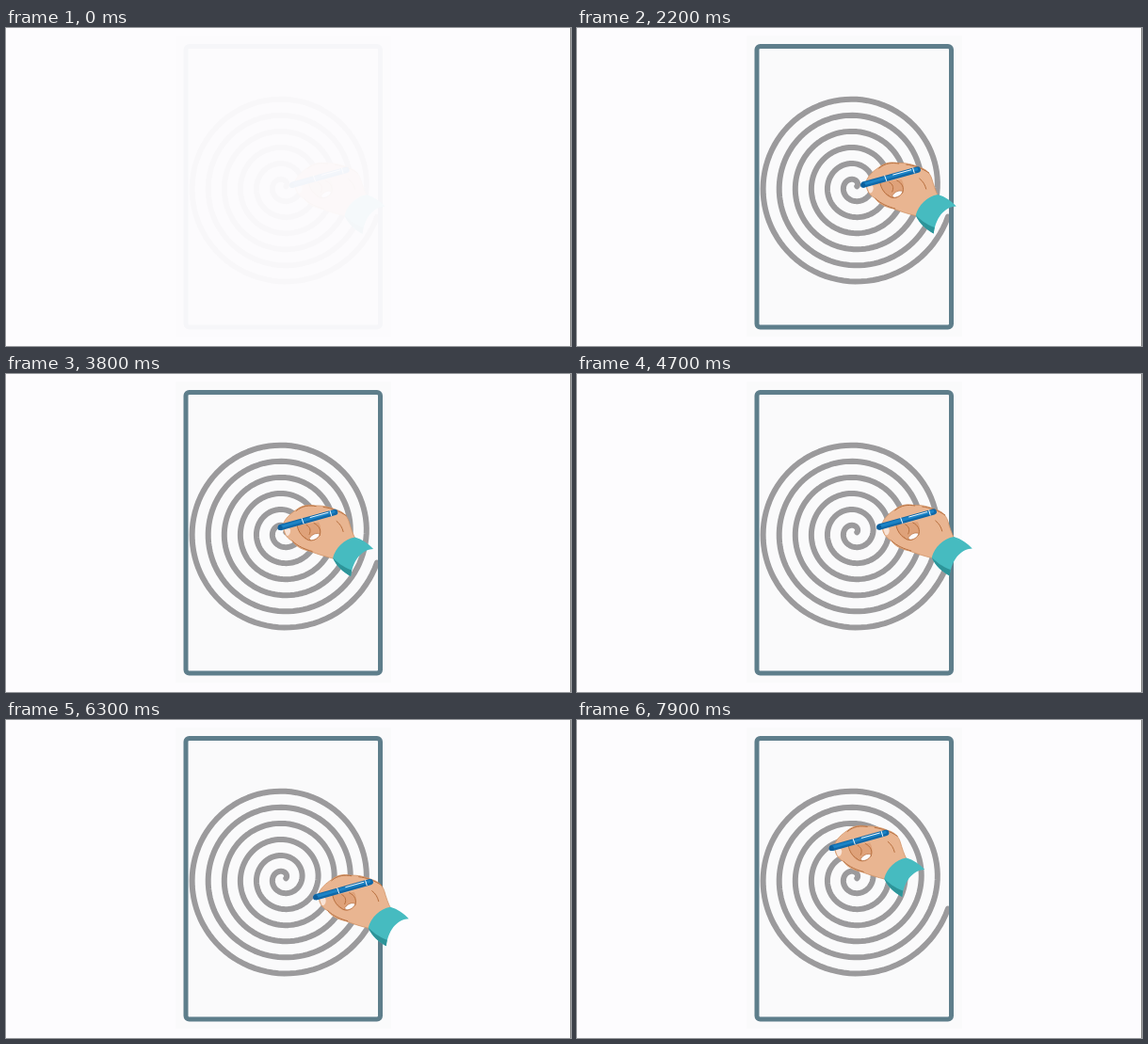
Recreate the animation shown at these times as an HTML page. Size 600 by 338 pixels, loop 8000 ms.

```html
<!DOCTYPE html>
<html lang="en">
<head>
<meta charset="utf-8">
<title>Spiral tracing</title>
<style>
  html, body { margin: 0; width: 100%; height: 100%; overflow: hidden; background: #fdfcfe; }
  svg { display: block; width: 100%; height: 100%; }
  .line { fill: none; stroke-linecap: round; stroke-linejoin: round; }
  .crease { stroke: #b8703f; stroke-width: 1; }
</style>
</head>
<body>
<svg viewBox="0 0 600 338">
  <rect width="600" height="338" fill="#fdfcfe"/>
  <g id="scene">
    <rect x="180" y="8" width="229" height="320" fill="#fafafb"/>
    <path id="spiral" class="line" stroke="#9b9a9c" stroke-width="6"/>
    <rect x="191" y="19.5" width="206.5" height="298.5" rx="3.5" fill="none" stroke="#5e7e8b" stroke-width="5"/>
    <g id="hand">
      <!-- skin -->
      <path fill="#e9b591" stroke="#d29568" stroke-width=".8"
        d="M307 164 C309 157 315 152 321 148 C327 143 334 142 341 143.5 C349 143 357 145 364 148
           C371 150 375 154 377 160 C379 167 381 173 384 179 L362 200 C353 198 344 195 336 192
           C327 190 321 187 317 181 C313 179 309 175 308 170 Z"/>
      <!-- curled fingers -->
      <path fill="#dfa27a" d="M322 164 L345 161 C348 166 348 172 345 177 C341 182 334 182 329 178 C326 175 323 170 322 164 Z"/>
      <path class="line crease" d="M322 164 C323 170 326 175 331 178 M332 164 C336 166 337 170 335 174
           M340 162 C346 165 348 170 346 175 M331 178 C335 182 341 181 346 175 M317 181 C323 187 331 190 338 192
           M364 160 C368 163 370 167 371 171"/>
      <path class="line crease" d="M321 149 C328 143 335 143 342 144 M350 145 C358 146 367 149 374 154"/>
      <path fill="#fdfcfe" stroke="#b8703f" stroke-width=".7" d="M335 178 C338 174 342 172 346 173.5 C346 177 340 181 336 180 Z"/>
      <path fill="#f8e3d6" d="M308.5 169 C311 165 314.5 166 315 170 C315 174 312 177 310.5 174.5 Z"/>
      <!-- sleeve -->
      <path fill="#46bbc0" d="M360 199 C363 188 372 179 383.5 177 C391 179 398 184 403 189.5
           C393 190 382 198 379 218.5 C371 214 364 208 360 199 Z"/>
      <path fill="#2d9499" d="M360 199 C364 203 371 209 380 212 L379 218.5 C371 214 364 208 360 199 Z"/>
      <!-- pen -->
      <path class="line" stroke="#0f68a8" stroke-width="6.4" d="M305 166.4 L362 150.5"/>
      <path class="line" stroke="#1b83c6" stroke-width="3" d="M306 165.6 L361 150"/>
      <path class="line" stroke="#f4f8fb" stroke-width="1" d="M327 157 L329 162.5 M336 156 L355 150.7 M357 149 L358.5 154"/>
      <circle cx="304" cy="167" r="2.6" fill="#0d5f9c"/>
    </g>
  </g>
  <rect x="599" width="1" height="338" fill="#858585"/>
</svg>
<script>
  const LOOP = 8000, STEP = 100;
  const CX = 294.5, CY = 168.3, R0 = 2.8, PITCH = 17.1, TURNS = 5.95;
  const $ = id => document.getElementById(id);

  // Archimedean spiral, counter-clockwise on screen
  function point(turn) {
    const r = R0 + PITCH * turn, a = turn * 2 * Math.PI;
    return [CX + r * Math.cos(a), CY - r * Math.sin(a)];
  }

  const dots = [];
  for (let i = 0; i <= 600; i++) dots.push(point(TURNS * i / 600).map(v => v.toFixed(2)));
  $("spiral").setAttribute("d", "M" + dots.join("L"));

  // time in ms, turns traced by the pen
  const KEYS = [
    [0, 0], [2100, 0], [3000, .12], [3800, .44], [4700, 1.034], [5700, 1.589],
    [6600, 2.05], [7000, 2.143], [7500, 2.29], [8000, 2.395]
  ];

  function turnAt(t) {
    const i = KEYS.findIndex(k => k[0] > t);
    const [t0, u0] = KEYS[i - 1], [t1, u1] = KEYS[i];
    return u0 + (u1 - u0) * (t - t0) / (t1 - t0);
  }

  function draw(now) {
    const t = Math.floor(now % LOOP / STEP) * STEP;
    const [x, y] = point(turnAt(t));
    $("scene").setAttribute("opacity", Math.min(1, .04 + .96 * t / 1000));
    // the pen tip rests slightly right of and above the line
    $("hand").setAttribute("transform", `translate(${x + 4.7 - 302.5} ${y - 2 - 166})`);
  }

  const start = performance.now();
  function tick() {
    draw(performance.now() - start);
    requestAnimationFrame(tick);
  }
  tick();
</script>
</body>
</html>
```
